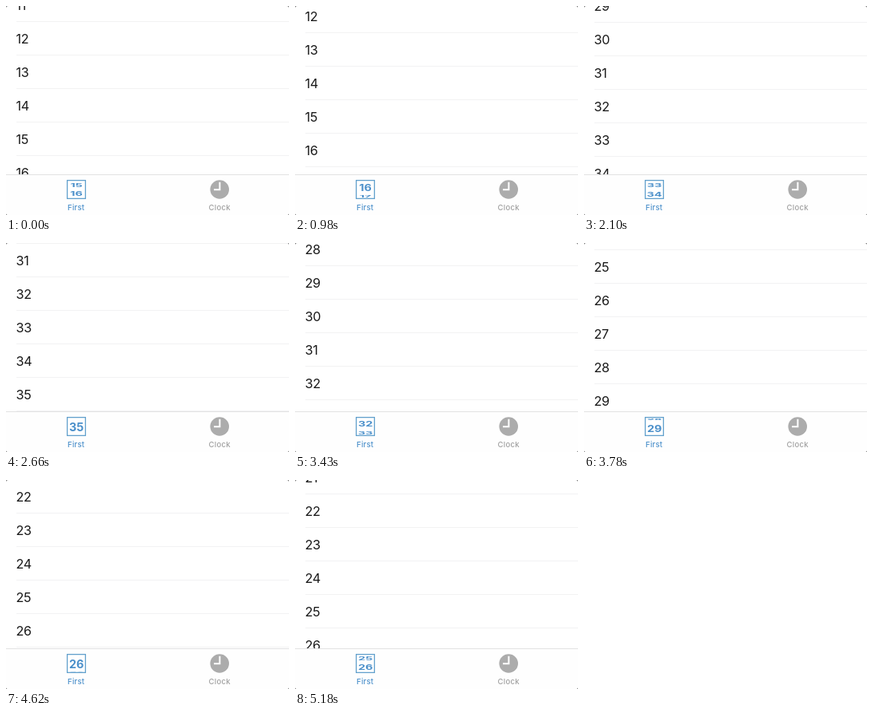
Write an HTML page that moves like this. It is 354 px wide and 262 px high and loops after 5250 ms.

```html
<!DOCTYPE html>
<html lang="en">
<head>
<meta charset="utf-8">
<title>Scrolling list with live tab icon</title>
<style>
  html, body { margin: 0; width: 100%; height: 100%; overflow: hidden; background: #777; }
  svg { display: block; width: 354px; height: 262px; font-family: Inter, "Liberation Sans", sans-serif; }
  .row { font-size: 16.2px; letter-spacing: -.2px; fill: #1a1a1a; }
  .rule { fill: #f2f2f3; }
  .digits { font-size: 14.4px; font-weight: 700; text-anchor: middle; }
  .label { font-size: 9.5px; font-weight: 500; letter-spacing: .25px; text-anchor: middle; }
  .on { fill: #4a8fca; }
  .off { fill: #a0a0a0; }
</style>
</head>
<body>
<svg viewBox="0 0 354 262">
  <defs>
    <clipPath id="screen"><rect width="354" height="262" rx="3"/></clipPath>
    <clipPath id="window"><rect x="77" y="219" width="22" height="22"/></clipPath>
  </defs>
  <g clip-path="url(#screen)">
    <rect width="354" height="262" fill="#fff"/>
    <g id="list"></g>
    <rect y="211" width="354" height="51" fill="#fefefe"/>
    <rect y="211" width="354" height="1" fill="#e2e2e3"/>
    <rect x="76.6" y="218.6" width="22.8" height="22.8" fill="#fff" stroke="#62a0cc" stroke-width="1.3"/>
    <g id="icon" class="digits on" clip-path="url(#window)"></g>
    <text class="label on" x="87.7" y="255.6">First</text>
    <circle cx="267.2" cy="230" r="11.8" fill="#acacac"/>
    <path d="M267.4 220.8V230.2H260" fill="none" stroke="#fff" stroke-width="2"/>
    <text class="label off" x="267.2" y="255.6">Clock</text>
  </g>
</svg>
<script>
const LOOP = 5250, STEP = 70, ROW = 42;
const NS = 'http://www.w3.org/2000/svg';

function add(parent, tag, attrs) {
  const el = document.createElementNS(NS, tag);
  for (const k in attrs) el.setAttribute(k, attrs[k]);
  return parent.appendChild(el);
}

const list = document.getElementById('list');
const icon = document.getElementById('icon');

const rows = Array.from({ length: 7 }, () => {
  const g = add(list, 'g', {});
  add(g, 'rect', { class: 'rule', x: 13, width: 341, height: 1 });
  return { g, text: add(g, 'text', { class: 'row', x: 12.4, y: -14.1 }) };
});
const digits = [0, 1].map(() => add(icon, 'text', { y: 5.6 }));

// Momentum scrolling: exponential approach to the resting offset.
const glide = (t, t0, from, end, tau) => end + (from - end) * Math.exp((t0 - t) / tau);

function offset(t) {
  if (t < 980) return 443;
  if (t < 2660) return glide(t, 1400, 928, 1291.6, 516);
  if (t < 3220) return 1260;
  if (t < 3290) return 1255;
  return glide(t, 3430, 1148, 857, 492);
}

function placeDigits(el, n, top, height) {
  el.textContent = n;
  el.setAttribute('transform', `translate(88.1 ${top + height / 2}) scale(1 ${height / 22})`);
}

function draw(t) {
  const s = Math.round(offset(t));
  const first = Math.floor(s / ROW);
  rows.forEach(({ g, text }, i) => {
    const n = first + i;
    text.textContent = n;
    g.setAttribute('transform', `translate(0 ${n * ROW - s})`);
  });

  // The icon shows the two lowest rows, each squeezed by how much of it is in view.
  const pos = s / ROW + 5.01;
  const n = Math.floor(pos), next = (pos - n) * 22;
  placeDigits(digits[0], n, 219.5, 22 - next);
  placeDigits(digits[1], n + 1, 241.5 - next, next);
}

const start = performance.now();
function tick() {
  const t = (performance.now() - start) % LOOP;
  draw(Math.floor(t / STEP) * STEP);
  requestAnimationFrame(tick);
}
tick();
</script>
</body>
</html>
```
